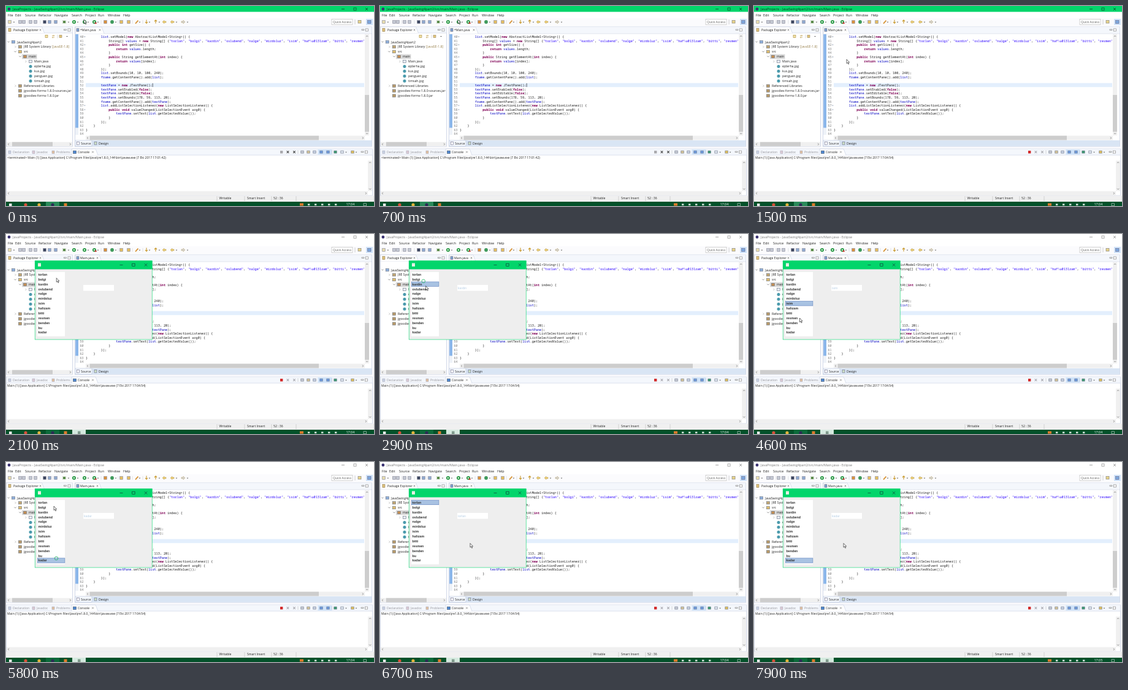
Animation, 600 px wide and 326 px high, one loop 8 s. Source, as an HTML page:

```html
<!DOCTYPE html>
<html lang="tr">
<head>
<meta charset="utf-8">
<title>List selection demo</title>
<style>
html, body { margin: 0; height: 100%; overflow: hidden; background: #fff; }
svg { display: block; width: 100vw; height: 100vh; font-family: "Open Sans", "Noto Sans", sans-serif; }
.code { font-family: "Noto Sans Mono", "DejaVu Sans Mono", monospace; }
.list { font-family: "Liberation Sans", sans-serif; }
</style>
</head>
<body>
<svg viewBox="0 0 600 326">
  <clipPath id="editor"><rect x="113" y="46" width="471" height="165"/></clipPath>
  <clipPath id="tree"><rect x="1" y="45" width="106" height="175"/></clipPath>
  <g id="still"></g>
  <g id="live"></g>
</svg>
<script>
const $ = id => document.getElementById(id);
const esc = s => s.replace(/[<>&]/g, c => `&#${c.charCodeAt(0)};`);
const rect = (x, y, w, h, fill, more = '') =>
  `<rect x="${x}" y="${y}" width="${w}" height="${h}" fill="${fill}" ${more}/>`;
const box = (x, y, w, h, fill, stroke) =>
  rect(x, y, w, h, fill, `stroke="${stroke}" stroke-width=".6"`);
const path = (d, stroke, fill = 'none', width = .7) =>
  `<path d="${d}" stroke="${stroke}" fill="${fill}" stroke-width="${width}"/>`;
const dot = (x, y, r, fill) => `<circle cx="${x}" cy="${y}" r="${r}" fill="${fill}"/>`;
const text = (x, y, s, size = 5.2, fill = '#222', more = '') =>
  `<text x="${x}" y="${y}" font-size="${size}" fill="${fill}" ${more}>${esc(s)}</text>`;
const cross = (x, y, r, color, width) =>
  path(`M${x - r} ${y - r}l${2 * r} ${2 * r}m0 ${-2 * r}l${-2 * r} ${2 * r}`, color, 'none', width);
const down = (x, y) => path(`M${x - 1.3} ${y - .6}h2.6l-1.3 1.5z`, 'none', '#555');
const minMax = (x, y) => box(x - 2, y - 1, 4, 1.3, '#fff', '#777') + box(x + 4.5, y - 2, 4, 4, '#fff', '#777');
const arrow = (x, dir, fill) =>
  path(`M${x + 3 * dir} 26l${-3 * dir}-2.6v1.5h${-3 * dir}v2.2h${3 * dir}v1.5z`, '#a0843c', fill, .4);
const scrollX = (x, y, w, from = 0, to = 0) => rect(x, y, w, 7, '#f0f0f0') + rect(from, y, to - from, 7, '#cdcdcd')
  + path(`M${x + 4} ${y + 2}l-1.6 1.6l1.6 1.6M${x + w - 4} ${y + 2}l1.6 1.6l-1.6 1.6`, '#666');
const scrollY = (x, y, h, from = 0, to = 0) => rect(x, y, 7, h, '#f0f0f0') + rect(x, from, 7, to - from, '#cdcdcd')
  + path(`M${x + 2} ${y + 4}l1.6-1.6l1.6 1.6M${x + 2} ${y + h - 4}l1.6 1.6l1.6-1.6`, '#666');

const GREEN = '#02d56b', LINE = '#b9c3da', PANE = '#fbfbfd';
const items = ['torlan', 'bolgi', 'kardin', 'oslubend', 'nalge', 'mirdoluz', 'isim',
  'hafızam', 'bitti', 'resmen', 'benden', 'bu', 'kadar'];
const LIST_TOP = 62, ROW = 7.88;
const rowY = i => LIST_TOP + i * ROW;

// Each line starts with its indent depth.
const code = `2list.setModel(new AbstractListModel<String>() {
3String[] values = new String[] {${items.slice(0, 10).map(s => `"${s.replace('ı', '\\u0131')}"`).join(', ')},
3public int getSize() {
4return values.length;
3}
3public String getElementAt(int index) {
4return values[index];
3}
2});
2list.setBounds(10, 10, 100, 240);
2frame.getContentPane().add(list);
0
2textPane = new JTextPane();
2textPane.setEnabled(false);
2textPane.setEditable(false);
2textPane.setBounds(178, 59, 113, 20);
2frame.getContentPane().add(textPane);
2list.addListSelectionListener(new ListSelectionListener() {
3public void valueChanged(ListSelectionEvent arg0) {
4textPane.setText(list.getSelectedValue());
3}
2});
1}
0}
0`.split('\n');

const span = (s, fill, weight = 400) => `<tspan fill="${fill}" font-weight="${weight}">${s}</tspan>`;
const paint = s => s
  .replace(/"[^"]*"?|\b(?:(new|public|void|int|return|false)|list|textPane|frame|values)\b|[<>&]/g, (m, keyword) =>
    keyword ? span(m, '#7f0055', 600)
    : m[0] === '"' ? span(m, '#2a00ff')
    : m.length > 1 ? span(m, '#0000c0') : esc(m));

function header() {
  let s = rect(0, 0, 600, 326, PANE) + rect(0, 9.5, 600, 10.5, '#fff');
  [['File', 3], ['Edit', 15], ['Source', 31], ['Refactor', 53], ['Navigate', 79], ['Search', 107],
   ['Project', 129], ['Run', 150], ['Window', 166], ['Help', 191]]
    .forEach(([name, x]) => s += text(x, 16.6, name, 5.4));
  const tools = { '#e6dcae': [6], '#c3c8d2': [23, 29, 40, 48], '#3c4660': [63], '#8fa9cf': [71, 81], '#d9913c': [162],
    '#e3bd62': [188, 200] };
  for (const c in tools) tools[c].forEach(x => s += box(x - 2.3, 23.6, 4.6, 4.8, c, '#889'));
  s += dot(95, 26, 2.2, '#5b8a4a') + path('M92 24l6 4m0-4l-6 4', '#5b8a4a');
  [111, 128, 144].forEach(x => s += dot(x, 26, 3, '#2a9a46') + path(`M${x - 1} 24.4l2.6 1.6l-2.6 1.6z`, 'none', '#fff'));
  s += rect(144.8, 26.8, 2.8, 2.2, '#c33') + dot(173, 26, 2.9, '#3f9a5c');
  s += path('M211 28.6l4.5-5', '#d8963a', 'none', 1.8) + path('M229 22.6v5.6l-2-2m2 2l2-2M244 28.6V23l-2 2m2-2l2 2', '#c99a2e', 'none', 1.1);
  s += arrow(258, -1, '#f0cf6c') + arrow(271, -1, '#f0cf6c') + arrow(289, 1, '#d8d8d8');
  [13, 102, 117, 134, 150, 179, 218, 234, 250, 278, 296].forEach(x => s += down(x, 26.4));
  [35, 56, 76, 155, 183, 206, 223].forEach(x => s += path(`M${x} 23v6`, '#c4c8d0', 'none', .5));
  s += box(531, 21.3, 34, 9, '#fff', '#b5b5b5') + text(533, 27.6, 'Quick Access', 5, '#666');
  s += path('M569 22v8', '#bbb') + box(574, 23.5, 5, 4.5, '#e8d48a', '#777');
  return s + rect(587, 21, 11, 10, '#cfe3fa') + box(589.5, 23.5, 5.5, 5, '#7da7dd', '#668');
}

function explorer() {
  let s = box(.5, 34, 108, 195, '#fff', LINE) + rect(.8, 34.3, 107.4, 9.4, '#f4f7fc');
  s += path('M.5 44h108', LINE, 'none', .5) + path('M.5 44V34h58l4 10', LINE, '#fff', .5);
  s += box(4, 36.5, 4, 5, '#e0c27a', '#8a7a55') + text(12, 41, 'Package Explorer', 5.1);
  s += cross(56, 39, 1.4, '#777') + minMax(96.5, 39);
  s += box(64, 47.5, 4, 4, '#f1e2a8', '#a98a3a') + path('M75 48.5h4l-1.5-1.3M79 51h-4l1.5 1.2', '#b8933a');
  s += path('M84 46.5v6', '#ccc') + box(87, 47.5, 4, 4, '#e3c67a', '#986') + down(99.5, 49.5);
  const rows = [['JavaSwing4part2', 18, 'v'], ['JRE System Library ', 29, '>'], ['src', 29, 'v'], ['main', 37, 'v'],
    ['Main.java', 46, '>'], ['ejderha.jpg', 46], ['kus.jpg', 46], ['penguen.jpg', 46], ['timsah.jpg', 46],
    ['Referenced Libraries', 29, '>'], ['jgoodies-forms-1.8.0-sources.jar', 29], ['jgoodies-forms-1.8.0.jar', 29]];
  const tints = ['#8fb0dd', '#c3a873', '#dfbd6f', '#c58f52', '#e8eef8'];
  s += rect(26, 78.6, 24.5, 7.8, '#d9d9d9') + '<g clip-path="url(#tree)">';
  rows.forEach(([name, x, mark], i) => {
    const y = 58.6 + i * 7.96, m = x - 13.5;
    if (mark === 'v') s += path(`M${m - 2} ${y - 1}l1.6 1.6l1.6-1.6`, '#555', 'none', .6);
    if (mark === '>') s += path(`M${m - 1} ${y - 1.6}l1.6 1.6l-1.6 1.6`, '#999', 'none', .6);
    s += name.endsWith('.jpg') ? dot(x - 6, y, 2.5, '#4a9aac') : box(x - 8.5, y - 2.2, 5, 4.4, tints[i] || '#b99b6a', '#6c7480');
    const label = text(x, y + 1.9, name);
    s += i === 1 ? label.replace('</text>', span(' [JavaSE-1.8]', '#957d47') + '</text>') : label;
  });
  return s + '</g>' + scrollX(1, 221.7, 107, 10, 76);
}

function editor() {
  let s = box(112.5, 34, 484, 195, '#fff', LINE) + rect(112.8, 34.3, 483.4, 10, '#f4f7fc');
  s += path('M112.5 45h484', LINE, 'none', .5) + minMax(582, 39);
  s += rect(113, 46, 5, 164, '#eef2f8') + rect(113.2, 46, 4.8, 152.5, '#8ab6ea');
  s += rect(130, 125.6, 454, 6.6, '#e3effd') + '<g class="code" clip-path="url(#editor)">';
  code.forEach((line, i) => {
    const y = 51.9 + i * 6.6;
    s += text(126.6, y, `${40 + i}`, 5, '#7c7c7c', 'text-anchor="end"');
    s += `<text x="${130 + line[0] * 12.4}" y="${y}" font-size="5.16" fill="#1c1c1c">${paint(line.slice(1))}</text>`;
  });
  [0, 2, 5, 17, 18].forEach(i => s += dot(128.4, 50 + i * 6.6, .9, '#a9b4c4'));
  s += '</g>' + scrollY(585, 46, 165, 145, 205) + scrollX(130, 211.5, 455, 136.5, 510);
  s += rect(112.8, 219, 483.4, 9.7, '#d9e5f4') + box(113, 219, 27, 9.5, '#f4f8fd', LINE);
  s += box(115.5, 221.5, 4, 4.5, '#fff', '#668') + text(122, 226, 'Source', 5.1);
  return s + box(144, 221.5, 4, 4.5, '#cfe3c8', '#668') + text(151, 226, 'Design', 5.1);
}

function consolePane() {
  let s = box(.5, 233, 597, 76, '#fff', LINE) + rect(.8, 233.3, 596.4, 9.4, '#f4f7fc');
  s += path('M.5 243h597', LINE, 'none', .5) + path('M107 243v-10h39l4 10', LINE, '#fff', .5);
  [['Declaration', 11, '#c9d3e4'], ['Javadoc', 50, '#dccbd4'], ['Problems', 82, '#dfbfa0']].forEach(([name, x, c]) =>
    s += box(x - 7, 236, 4, 4.4, c, '#aab') + text(x, 240, name, 5.1, '#96969c'));
  s += box(109.5, 236, 5, 4.4, '#4f86cf', '#456') + text(117, 240, 'Console', 5.1) + cross(141.5, 238, 1.4, '#777');
  s += rect(508.5, 233.8, 23, 8.4, '#cfe3fa');
  [[483, '#c9ccd6'], [493, '#d8c69a'], [503, '#c9d3e4'], [514, '#6d9be0'], [525, '#6d9be0'], [537, '#3f9b72'],
   [548, '#dfe6f0'], [565, '#e3c25e']].forEach(([x, c]) => s += box(x - 2.2, 236, 4.4, 4, c, '#6a7488'));
  s += down(554.5, 238.4) + down(571, 238.4) + minMax(581, 238);
  s += path('M476 235v6M531.5 235v6', '#ccc');
  return s + scrollX(1, 301.7, 589, 0, 0) + scrollY(590, 252, 49.5);
}

function footer() {
  let s = rect(0, 309.5, 600, 10, '#f0f0f0');
  [344, 389, 433, 473].forEach(x => s += path(`M${x} 310v8`, '#bdbdbd', 'none', .6));
  s += text(347.5, 315, 'Writable', 5.1) + text(393, 315, 'Smart Insert', 5.1) + text(436, 315, '52 : 36', 5.1);
  s += rect(0, 319, 600, 7, '#03512a');
  s += rect(5, 322, 4.5, 4, '#eee') + dot(32, 324, 2.6, '#d9503a') + dot(54, 324, 2.6, '#e3b43c');
  s += rect(94.5, 321.5, 5, 4.5, '#e07a2c') + rect(479, 321.5, 6, 4, '#e07a2c');
  [492, 503, 514, 525, 536].forEach(x => s += rect(x, 322.4, 3.4, 2.6, '#cfe0d6'));
  return s + box(583, 321.8, 4.4, 4, 'none', '#ddd');
}

const RUN = 1000, OPEN = 1700, KEY = 6900, REPEAT = 7400, NEXT_MINUTE = 7000;

// Mouse clicks as time, x, y: the first rows at a steady pace, then a few jumps
const clicks = [...Array(7).keys()].map(i => [2230 + i * 330, 70 + i * .8 + (i > 1) * 3, 69 + i * 7.8]);
clicks.push([4700, 74.5, 138], [5050, 77, 147], [5550, 82, 157], [6000, 74, 66]);

const stops = [[0, 127, 22], [900, 127, 22], [1450, 151, 87], [1700, 151, 87], ...clicks, [4350, 75, 116],
  [4600, 74.5, 137], [5600, 82, 157], [5800, 78, 72], [6150, 74, 66], [6600, 147, 132.5], [8000, 146, 132.5]]
  .sort((a, b) => a[0] - b[0]);

function pointer(t) {
  const i = stops.findIndex(s => s[0] > t), [t0, x0, y0] = stops[i - 1], [t1, x1, y1] = stops[i];
  const u = (t - t0) / (t1 - t0), k = u * u * (3 - 2 * u);
  return [x0 + (x1 - x0) * k, y0 + (y1 - y0) * k];
}

// The arrow key takes over after the last click: one press, then key repeat.
function selected(t) {
  if (t >= REPEAT) return Math.min(12, 2 + Math.floor((t - REPEAT) / 33));
  if (t >= KEY) return 1;
  const past = clicks.filter(c => c[0] <= t).pop();
  return past ? Math.floor((past[2] - LIST_TOP) / ROW) : -1;
}

function titleBar(active) {
  const ink = active ? '#06331c' : '#777';
  return rect(0, 0, 600, 9.5, active ? GREEN : '#fff') + dot(5, 5, 2.4, '#3b3372')
    + text(11, 7, 'JavaProjects - JavaSwing4part2/src/main/Main.java - Eclipse', 5.45, ink)
    + path('M547 5h5', ink) + box(567, 3, 4, 4, 'none', ink) + cross(588, 5, 2, ink);
}

function appWindow(t) {
  const sel = selected(t);
  let s = box(47.2, 43.8, 191, 128.2, '#eeeeee', GREEN) + rect(47, 43.5, 191.4, 14, GREEN);
  s += rect(52, 47.5, 5, 5.5, '#e9efe6') + path('M185.5 50.5h5', '#123', 'none', .6);
  s += box(205.7, 48.2, 4.4, 4.4, 'none', '#123') + cross(228, 50.4, 2.2, '#123', .6);
  s += rect(51, 61.8, 45, 105, '#fff') + rect(126, 83, 50, 9.6, '#fff') + '<g class="list">';
  if (sel >= 0) {
    s += box(51.3, rowY(sel) + .2, 44.6, 7.5, '#a8c2e2', '#6382bf');
    s += text(127, 90, items[sel], 5.2, '#b8cfe5');
  }
  items.forEach((name, i) => s += text(52.5, rowY(i) + 5.9, name, 5.3, '#303030', 'font-weight="bold"'));
  return s + '</g>';
}

function live(t) {
  const running = t >= RUN, open = t >= OPEN, tab = running ? 143 : 147;
  let s = titleBar(!open);
  s += path(`M113 45V34.3h${tab - 104}l4 10.7`, LINE, '#fff', .5) + box(115, 36.7, 4, 4.6, '#7ea0cf', '#667');
  s += text(121, 41, (running ? '' : '*') + 'Main.java', 5.1) + cross(tab + 6, 39, 1.4, '#777');
  s += text(2, 249.4, (running ? '' : '<terminated> ') + 'Main (1) [Java Application] C:\\Program Files\\Java\\jre1.8.0_144\\bin\\javaw.exe (7 Eki 2017 '
    + (running ? '17:04:54)' : '17:01:42)'), 5.06);
  s += rect(447, 235.9, 4.4, 4.4, running ? '#d22a2a' : '#a9a9ad');
  [459.5, 470].forEach(x => s += cross(x, 238, 1.8, running ? '#a9a9b0' : '#444', 1.1));
  if (!running) s += rect(238.8, 126, .6, 6, '#000');
  s += rect(65, 319, 22, 7, open ? '#0c6a3a' : '#2b8a5a') + dot(76, 324, 2.6, '#2c2a55');
  s += text(554.5, 324.9, t < NEXT_MINUTE ? '17:04' : '17:05', 5.4, '#fff');
  if (open) s += rect(108, 319, 22, 7, '#d5eadf') + rect(117, 321.5, 4.5, 4.5, '#7f9a8c') + appWindow(t);
  const click = clicks.find(c => t >= c[0] && t < c[0] + 350);
  if (click) s += `<circle cx="${click[1]}" cy="${click[2]}" r="2.8" fill="none" stroke="#25b565" stroke-width=".8"/>`;
  const [x, y] = pointer(t);
  return s + path(`M${x} ${y}v6.6l1.5-1.4l1.2 2.6l1.1-.5l-1.2-2.5h2z`, '#111', '#fff', .6);
}

$('still').innerHTML = header() + explorer() + editor() + consolePane() + footer();
let last = -1;
function tick() {
  const t = Math.floor(performance.now() % 8000 / 100) * 100;
  if (t !== last) $('live').innerHTML = live(last = t);
  requestAnimationFrame(tick);
}
tick();
</script>
</body>
</html>
```
